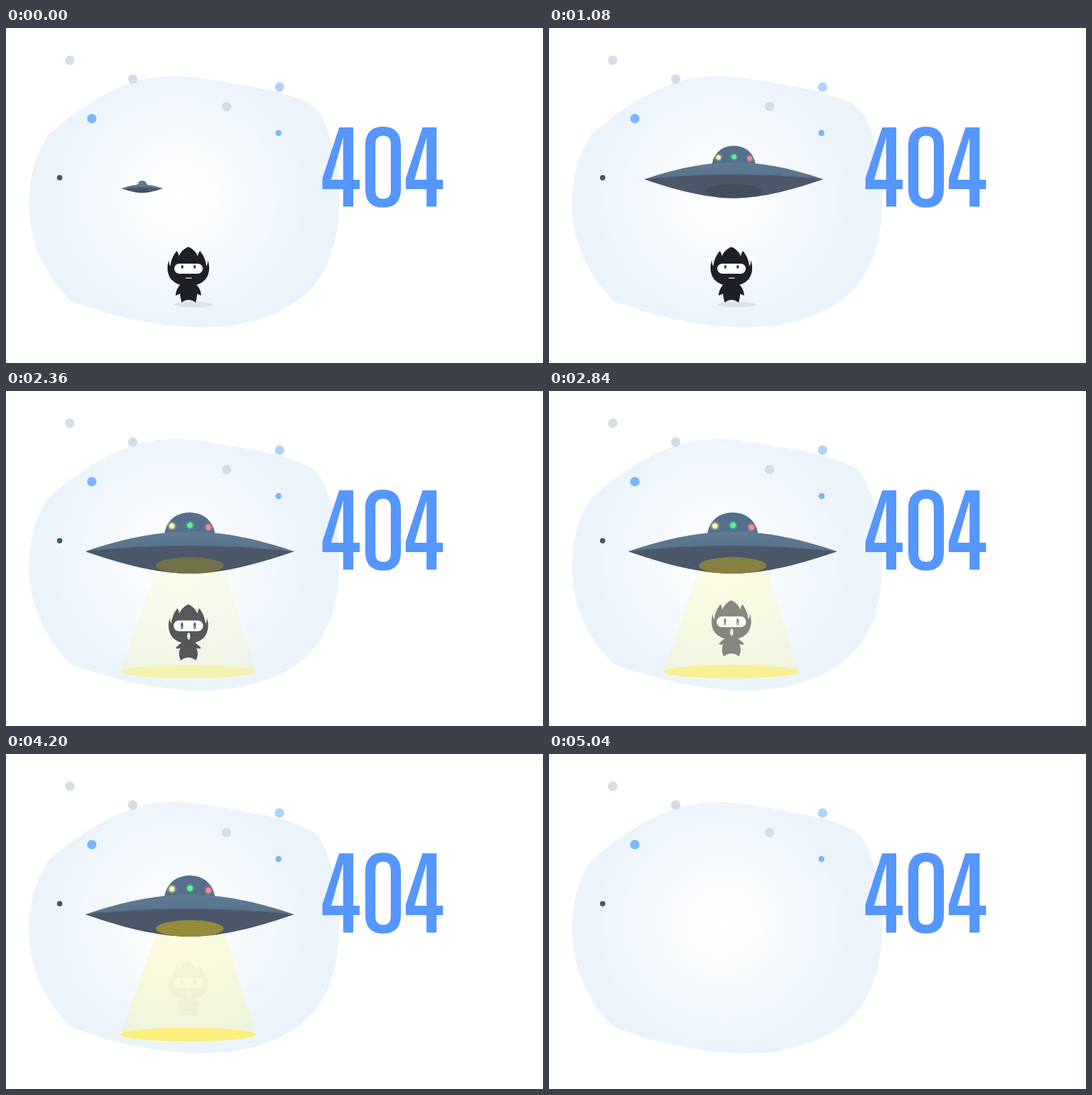
An HTML page that plays this animation: 801x499 px, repeating every 6200 ms.

```html
<!DOCTYPE html>
<html lang="en">
<head>
<meta charset="utf-8">
<title>404</title>
<style>
  html, body { margin: 0; width: 100%; height: 100%; overflow: hidden; background: #fff; }
  svg { display: block; width: 801px; height: 499px; }
</style>
</head>
<body>
<svg viewBox="0 0 801 499" role="img" aria-label="404">
  <defs>
    <radialGradient id="sky" gradientUnits="userSpaceOnUse" cx="258" cy="250" r="190">
      <stop offset="0" stop-color="#fff"/>
      <stop offset=".25" stop-color="#fbfdfe"/>
      <stop offset="1" stop-color="#ecf4fb"/>
    </radialGradient>
    <linearGradient id="top" x1="0" y1="0" x2="0" y2="1">
      <stop offset="0" stop-color="#5f7b94"/>
      <stop offset="1" stop-color="#58728a"/>
    </linearGradient>
    <path id="hull" d="M-156 0Q0-17 156 0C90 23 40 33 0 33C-40 33-90 23-156 0Z"/>
    <clipPath id="hullClip"><use href="#hull"/></clipPath>
    <path id="four" fill-rule="evenodd"
      d="M497 148H518V226H527.5V240H518V266H503V240H472V224ZM503 163L485 226H503Z"/>
    <path id="head" d="M272 326C277 328 284 333 286 340Q287 335 289 332C294 337 298 346 299 355Q301 352 301 346C305 357 303 368 297 375C291 381 283 384 272 384C261 384 253 381 247 375C241 368 239 357 243 346Q243 352 245 355C246 346 250 337 255 332Q257 335 258 340C260 333 267 328 272 326Z"/>
  </defs>

  <path fill="url(#sky)" d="M63 159C105 121 160 87 204 77C235 70 265 70 300 76C340 83 380 89 408 96C435 104 458 112 467 125C485 155 497 200 497 258C497 320 478 375 438 404C400 432 350 446 292 446C220 445 150 427 97 407C60 372 34 318 34 264C34 222 44 188 63 159Z"/>
  <g id="dots"></g>

  <g fill="#5596ff">
    <use href="#four"/>
    <use href="#four" x="124.3"/>
    <path fill-rule="evenodd" d="M536 175C536 157 545 147 562.5 147S589 157 589 175V240C589 258 580 267.500 562.500 267.500S536 258 536 240ZM551 173V242C551 250 555 254.500 562.500 254.500S574 250 574 242V173C574 165 570 160.500 562.500 160.500S551 165 551 173Z"/>
  </g>

  <g id="beam" fill="#ffee58">
    <path fill-opacity=".25" d="M226 259H323L373 418A101 10 0 0 1 171 418Z"/>
    <ellipse cx="272" cy="418" rx="101" ry="10"/>
  </g>

  <g id="standing" fill="#1d2027">
    <ellipse cx="280" cy="412" rx="29" ry="4" fill="#d9e4ea"/>
    <use href="#head"/>
    <path d="M262 380C256 386 253 392 253 398.500L259.500 396C260 400 261 405 262 409Q272 401 283 409C284 404 285 400 285 396L291 398.500C291 392 288 386 282 380Z"/>
    <rect x="251" y="351" width="42.500" height="15" rx="7.500" fill="#fff"/>
    <ellipse cx="263" cy="356" rx="1.700" ry="2.700"/>
    <ellipse cx="281.500" cy="356" rx="1.700" ry="2.700"/>
    <path d="M263 356.500v1.500M281.500 356.500v1.500" stroke="#fff" stroke-width=".8"/>
    <path d="M268 372.500h9" stroke="#fff" stroke-width="1.200"/>
  </g>

  <g id="floating" fill="#1d2027">
    <use href="#head" transform="translate(13.600 0) scale(.95 1)"/>
    <path d="M264 380C261 385 256 387 253 391Q257 393 260 391C257 398 258 404 260.500 409.500Q272 401 283.500 409.500C286 404 287 398 284 391Q288 393 291 391C288 387 283 385 280 380Z"/>
    <rect x="250" y="350" width="44" height="16" rx="8" fill="#fff"/>
    <ellipse cx="262.500" cy="358" rx="1.800" ry="5"/>
    <ellipse cx="281.500" cy="358" rx="1.800" ry="5"/>
    <path d="M262.500 358v3.500M281.500 358v3.500" stroke="#fff" stroke-width=".8"/>
    <ellipse cx="272.500" cy="373.500" rx="2.200" ry="5" fill="#fff"/>
  </g>

  <g id="ufo">
    <path fill="#54708a" d="M-38-25C-35-47-19-58 0-58S35-47 38-25Z"/>
    <g id="lights"></g>
    <path fill="url(#top)" d="M-156 0C-100-19-50-29.500 0-29.500S100-19 156 0Q0-10-156 0Z"/>
    <use href="#hull" fill="#4a586a"/>
    <g clip-path="url(#hullClip)">
      <ellipse cx="0" cy="21" rx="50.500" ry="12.500" fill="#444f5d"/>
      <ellipse id="glow" cx="0" cy="21" rx="50.500" ry="12.500" fill="#ffd710"/>
    </g>
  </g>
</svg>
<script>
const LOOP = 6200, STEP = 40;
const LAND = 1280, BEAM_END = 4520, LIFT = 1960, HALF = 2400;

const $ = id => document.getElementById(id);
const [beam, standing, floating, ufo, glow] =
  ['beam', 'standing', 'floating', 'ufo', 'glow'].map($);

const circle = (x, y, r, fill, alpha = 1) =>
  `<circle cx="${x}" cy="${y}" r="${r}" fill="${fill}" fill-opacity="${alpha}"/>`;

$('dots').innerHTML = [
  [95, 48, 7, '#d4dfe9'], [189, 76, 7, '#d2dde8'], [329, 117, 7, '#d5dde8'],
  [408, 88, 7, '#afd3f6'], [128, 135, 7, '#7ab6fd'], [406.5, 156.5, 4.5, '#7ab6fb'],
  [80, 223, 4, '#43586b']
].map(d => circle(...d)).join('');

$('lights').innerHTML = [
  [-26.5, -38, '#fff3a8'], [0.5, -39, '#5df29a'], [28, -36, '#f78a9a']
].map(([x, y, c]) => circle(x, y, 7, c, .18) + circle(x, y, 5.3, c, .25) + circle(x, y, 3.9, c)).join('');

// Flight path: x, y, scale at equal intervals
const flight = [[203, 239, .2], [310, 236.5, .467], [277, 213.5, .733], [274, 239, 1]];

const clamp = v => Math.min(1, Math.max(0, v));
const ease = p => (1 - Math.cos(Math.PI * clamp(p))) / 2;

function flightAt(t) {
  const p = clamp((t - 40) / 1260) * 3;
  const i = Math.min(2, Math.floor(p));
  const e = ease(p - i);
  return flight[i].map((v, k) => v + (flight[i + 1][k] - v) * e);
}

function draw(t) {
  const [x, y, s] = flightAt(t);
  ufo.setAttribute('transform', `translate(${x} ${y}) scale(${s})`);
  ufo.setAttribute('opacity', clamp((5040 - t) / 200));

  // The beam and the lift share one back-and-forth cycle
  const phase = Math.max(0, t - LAND) / HALF;
  const swing = phase > 1 ? 2 - phase : phase;
  const light = t < BEAM_END ? swing : 0;
  beam.setAttribute('opacity', light);
  glow.setAttribute('opacity', light * .56);

  const fade = 1 - ease((t - 1240) / (BEAM_END - 1240));
  standing.setAttribute('opacity', t < LIFT ? fade : 0);
  floating.setAttribute('opacity', t < LIFT ? 0 : fade);
  floating.setAttribute('transform', `translate(0 ${-19.5 * ease(swing)})`);
}

const start = performance.now();
function tick() {
  const t = (performance.now() - start) % LOOP;
  draw(Math.floor(t / STEP) * STEP);
  requestAnimationFrame(tick);
}
tick();
</script>
</body>
</html>
```
